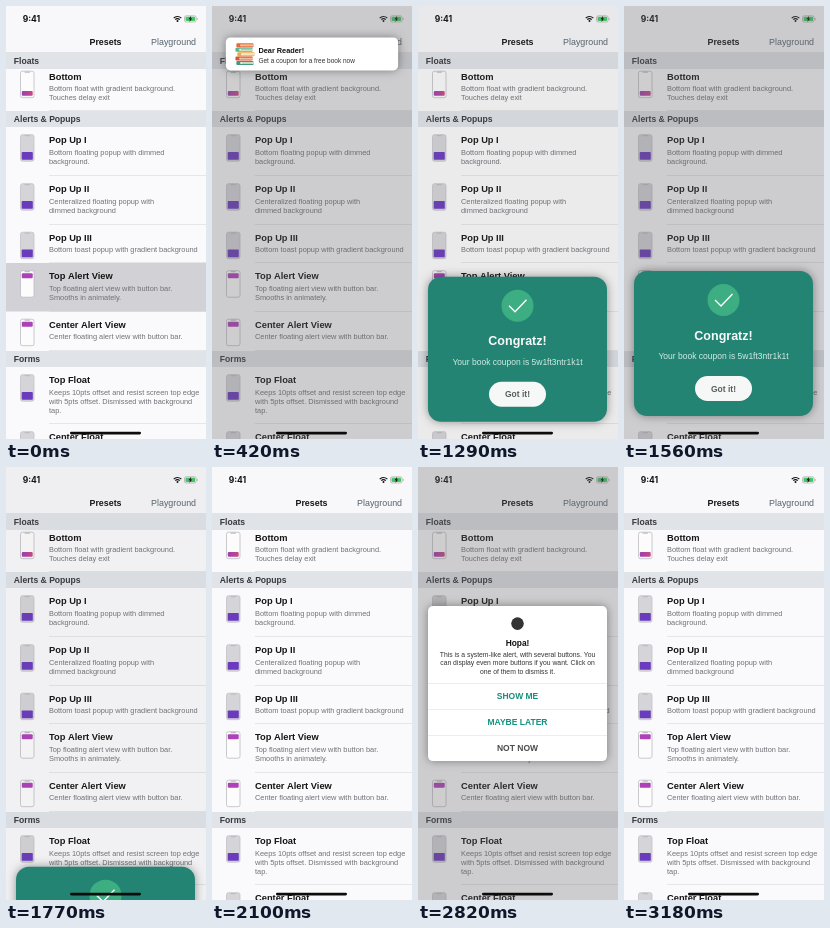
Write an HTML page with a canvas that moves like this. It is 200 px wide and 433 px high and loops after 3.21 s.

```html
<!DOCTYPE html>
<html lang="en">
<head>
<meta charset="utf-8">
<title>Presets</title>
<style>
html, body { margin: 0; width: 100%; height: 100%; overflow: hidden; background: #fafafc; }
canvas { display: block; width: 200px; height: 433px; }
</style>
</head>
<body>
<canvas id="stage"></canvas>
<script>
const W = 200, H = 433, LOOP = 3210;
const SANS = '"Liberation Sans", Arial, sans-serif';
const TEAL = '#149080', PURPLE = '#6a3bbd', PINK = '#ad42b8';
const canvas = document.getElementById('stage');
const ctx = canvas.getContext('2d');
const dpr = window.devicePixelRatio || 1;
canvas.width = W * dpr;
canvas.height = H * dpr;

const clamp = v => Math.max(0, Math.min(1, v));
const span = (t, start, dur) => clamp((t - start) / dur);
const smooth = u => u * u * (3 - 2 * u);

function spring(u) {
  if (u <= 0) return 0;
  if (u >= 1) return 1;
  const zeta = 0.8, k = 8.6 * u, d = k * 0.6;
  return 1 - Math.exp(-zeta * k) * (Math.cos(d) + zeta / 0.6 * Math.sin(d));
}

function box(x, y, w, h, r, fill, stroke, line = 0.6) {
  ctx.beginPath();
  ctx.roundRect(x, y, w, h, r);
  if (fill) { ctx.fillStyle = fill; ctx.fill(); }
  if (stroke) { ctx.strokeStyle = stroke; ctx.lineWidth = line; ctx.stroke(); }
}

function disc(x, y, r, fill) {
  ctx.beginPath();
  ctx.arc(x, y, r, 0, Math.PI * 2);
  ctx.fillStyle = fill;
  ctx.fill();
}

// y is the middle of the capital letters
function text(str, x, y, size, color, { bold = false, align = 'left', font = SANS } = {}) {
  ctx.font = `${bold ? 'bold ' : ''}${size}px ${font}`;
  ctx.textAlign = align;
  ctx.fillStyle = color;
  ctx.fillText(str, x, y + size * 0.36);
}

function card(x, y, w, h, r, fill) {
  ctx.save();
  ctx.shadowColor = 'rgba(0,0,0,0.4)';
  ctx.shadowBlur = 10 * dpr;
  box(x, y, w, h, r, fill);
  ctx.restore();
}

function scaleAbout(x, y, s) {
  ctx.translate(x, y);
  ctx.scale(s, s);
  ctx.translate(-x, -y);
}

const headers = [['Alerts & Popups', 105], ['Forms', 345]];
const rows = [
  { top: 57.5, h: 47.5, kind: 'bottom', title: 'Bottom', lines: ['Bottom float with gradient background.', 'Touches delay exit'] },
  { top: 121, h: 49, kind: 'popup', title: 'Pop Up I', lines: ['Bottom floating popup with dimmed', 'background.'] },
  { top: 170, h: 48.5, kind: 'popup', title: 'Pop Up II', lines: ['Centeralized floating popup with', 'dimmed background'] },
  { top: 218.5, h: 38.5, kind: 'popup', title: 'Pop Up III', lines: ['Bottom toast popup with gradient background'] },
  { top: 257, h: 48.5, kind: 'top', title: 'Top Alert View', lines: ['Top floating alert view with button bar.', 'Smooths in animately.'] },
  { top: 305.5, h: 39.5, kind: 'top', title: 'Center Alert View', lines: ['Center floating alert view with button bar.'] },
  { top: 361, h: 57, kind: 'popup', title: 'Top Float', lines: ['Keeps 10pts offset and resist screen top edge', 'with 5pts offset. Dismissed with background', 'tap.'] },
  { top: 418, h: 49, kind: 'popup', title: 'Center Float', lines: [] }
];

function phone(y, kind) {
  const gray = kind === 'popup';
  box(14.5, y, 13.5, 26.5, 2, gray ? '#d5d4d8' : '#fcfcfc', gray ? '#c3c2c7' : '#bdbdc2', 0.8);
  box(18.5, y + 0.3, 5.5, 1.2, 0.6, '#bdbdc2');
  if (gray) box(15.7, y + 17.3, 11.1, 7.7, 0.8, PURPLE);
  else if (kind === 'top') box(15.8, y + 2.5, 10.9, 5, 1, PINK);
  else {
    const g = ctx.createLinearGradient(16, 0, 27, 0);
    g.addColorStop(0, '#9c3fb4');
    g.addColorStop(1, '#cc4880');
    box(15.8, y + 19.8, 10.9, 4.7, 1, g);
  }
}

function row({ top, h, kind, title, lines }, lit) {
  if (lit > 0) {
    ctx.globalAlpha = lit;
    box(0, top, W, h, 0, '#d2d1d5');
    ctx.globalAlpha = 1;
  }
  box(43, top + h - 0.5, W - 43, 0.5, 0, '#d3d3d6');
  phone(top + 7.7, kind);
  text(title, 43, top + 13.1, 9.3, '#151515', { bold: true });
  lines.forEach((s, i) => text(s, 43, top + 25.2 + i * 9, 7.4, '#717177'));
}

function header(label, y) {
  box(0, y, W, 16, 0, '#e0e3e8');
  text(label, 7.8, y + 8.2, 8.6, '#38383c', { bold: true });
}

function statusBar() {
  text('9:41', 16.7, 13, 8.5, '#111', { bold: true, font: 'Inter, sans-serif' });
  ctx.strokeStyle = '#111';
  ctx.lineWidth = 1.2;
  [3, 5.2].forEach(r => {
    ctx.beginPath();
    ctx.arc(171.5, 15.7, r, -Math.PI * 0.76, -Math.PI * 0.24);
    ctx.stroke();
  });
  disc(171.5, 15.1, 1, '#111');
  box(178.5, 9.8, 11.6, 6.2, 1.7, null, '#9a9a9c', 0.6);
  box(179.5, 10.8, 9.6, 4.2, 0.9, '#45c763');
  box(190.8, 11.9, 0.7, 2, 0.3, '#9a9a9c');
  ctx.beginPath();
  ctx.moveTo(185.2, 9.8);
  ctx.lineTo(182.5, 13.3);
  ctx.lineTo(184, 13.3);
  ctx.lineTo(183.4, 16);
  ctx.lineTo(186.2, 12.4);
  ctx.lineTo(184.6, 12.4);
  ctx.closePath();
  ctx.fillStyle = '#111';
  ctx.fill();
}

function page(t) {
  box(0, 0, W, H, 0, '#fafafc');
  const topLit = 1 - span(t, 90, 150);
  const centerLit = t < 2190 ? 0 : 1 - span(t, 2265, 140);
  rows.forEach((r, i) => row(r, i === 4 ? topLit : i === 5 ? centerLit : 0));
  headers.forEach(([s, y]) => header(s, y));
  header('Floats', 47);
  box(0, 0, W, 47, 0, '#f8f8fa');
  box(0, 46.6, W, 0.5, 0, '#cfcfd3');
  text('Presets', 99.5, 35.7, 8.9, '#151515', { bold: true, align: 'center' });
  text('Playground', 190, 35.7, 8.9, '#55626f', { align: 'right' });
  statusBar();
}

function dim(level) {
  if (level <= 0) return;
  ctx.globalAlpha = 0.3 * level;
  box(0, 0, W, H, 0, '#646466');
  ctx.globalAlpha = 1;
}

function books(x, y) {
  const stack = [[1, '#e5683f', '#f3d9b0'], [0, '#58b596', '#f6ecd2'], [2, '#efaa48', '#fdf3da'],
                 [0, '#d9543c', '#f3dfbd'], [1, '#3f9b7c', '#f4e9cf']];
  stack.forEach(([dx, cover, paper], i) => {
    const by = y + i * 4.6;
    box(x + dx, by, 18, 4.2, 1.1, cover);
    box(x + dx + 4, by + 1.1, 14, 2, 0.5, paper);
    box(x + dx + 6, by + 1.9, 11, 0.4, 0, cover);
  });
}

function topAlert(t) {
  if (t < 190 || t > 1200) return;
  const grow = span(t, 190, 290);
  const scale = 0.6 + 0.4 * smooth(grow);
  const exit = span(t, 1110, 75) ** 2;
  const open = smooth(span(t, 480, 115));
  const y = 30 - 100 * (1 - spring(grow)) - 105 * exit;
  const bar = 26 * open, h = 34.5 + bar;
  ctx.save();
  scaleAbout(99.5, y + h / 2, scale);
  card(10, y, 180, h, 5, '#fff');
  box(10, y, 180, h, 5);
  ctx.clip();
  books(20, y + 6.2);
  text('Dear Reader!', 44, y + 13.7, 7.7, '#111', { bold: true });
  text('Get a coupon for a free book now', 44, y + 24.7, 6.8, '#333');
  if (open > 0) {
    const top = y + 34.5, mid = top + bar / 2;
    if (t >= 1050) box(100, top, 90, bar, 0, '#f1f3f3');
    ctx.globalAlpha = open;
    box(10, top, 180, 0.5, 0, '#dcdcdc');
    box(99.75, top, 0.5, bar, 0, '#dcdcdc');
    text('NOT NOW', 55, mid, 8.4, '#4c4c4e', { bold: true, align: 'center' });
    text('SHOW ME', 144.5, mid, 8.5, TEAL, { bold: true, align: 'center' });
  }
  ctx.restore();
}

function popup(t) {
  if (t < 1190 || t > 1800) return;
  const enter = spring(span(t, 1190, 244));
  const exit = smooth(span(t, 1714, 84));
  const y = 265 + 168 * (1 - enter) + 178 * exit;
  const mid = { align: 'center' }, strong = { bold: true, align: 'center' };
  card(10, y, 179, 145, 13, '#238473');
  disc(99.5, y + 29, 16, '#3cae82');
  ctx.beginPath();
  ctx.moveTo(91, y + 29);
  ctx.lineTo(97, y + 35);
  ctx.lineTo(108.5, y + 23);
  ctx.strokeStyle = '#fff';
  ctx.lineWidth = 1.4;
  ctx.stroke();
  text('Congratz!', 99.5, y + 64, 12.5, '#f6fbfa', strong);
  text('Your book coupon is 5w1ft3ntr1k1t', 99.5, y + 85, 8.5, '#d3ebe5', mid);
  box(71, y + 105, 57, 25, 12.5, '#f6f7f7');
  text('Got it!', 99.5, y + 117.5, 8.5, '#56605e', strong);
}

function centerAlert(t) {
  if (t < 2265 || t > 2970) return;
  const alpha = span(t, 2265, 110) * (1 - span(t, 2890, 75));
  if (alpha <= 0) return;
  const scale = 0.9 + 0.1 * (1 - (1 - span(t, 2265, 150)) ** 3);
  const open = smooth(span(t, 2408, 130));
  const bar = 78 * open, h = 77 + bar, y = 216.6 - h / 2;
  const mid = { align: 'center' }, strong = { bold: true, align: 'center' };
  ctx.save();
  scaleAbout(99.5, 216.6, scale);
  ctx.globalAlpha = alpha;
  card(10, y, 179, h, 5, '#fff');
  box(10, y, 179, h, 5);
  ctx.clip();
  disc(99.5, y + 17.5, 6.3, '#333');
  text('Hopa!', 99.5, y + 37, 8.4, '#111', strong);
  ['This is a system-like alert, with several buttons. You',
   'can display even more buttons if you want. Click on',
   'one of them to dismiss it.'].forEach((s, i) => text(s, 99.5, y + 48.7 + i * 8.2, 6.8, '#333', mid));
  if (open > 0) {
    const step = bar / 3;
    ['SHOW ME', 'MAYBE LATER', 'NOT NOW'].forEach((s, i) => {
      const top = y + 77 + i * step;
      ctx.globalAlpha = alpha * open * open;
      box(10, top, 179, 0.5, 0, '#dcdcdc');
      ctx.globalAlpha = alpha * Math.min(1, open * 3);
      text(s, 99.5, top + step / 2, 8.5, i < 2 ? TEAL : '#4c4c4e', strong);
    });
  }
  ctx.restore();
}

function draw(t) {
  ctx.setTransform(dpr, 0, 0, dpr, 0, 0);
  page(t);
  dim(smooth(span(t, 170, 230)) * (1 - span(t, 1110, 75)));
  topAlert(t);
  dim(smooth(span(t, 1190, 260)) * (1 - span(t, 1710, 75)));
  popup(t);
  dim(span(t, 2265, 150) * (1 - span(t, 2890, 75)));
  centerAlert(t);
  box(64, 425.7, 71, 2.7, 1.35, '#0c0c0c');
}

const start = performance.now();
function tick() {
  draw((performance.now() - start) % LOOP);
  requestAnimationFrame(tick);
}
tick();
</script>
</body>
</html>
```
